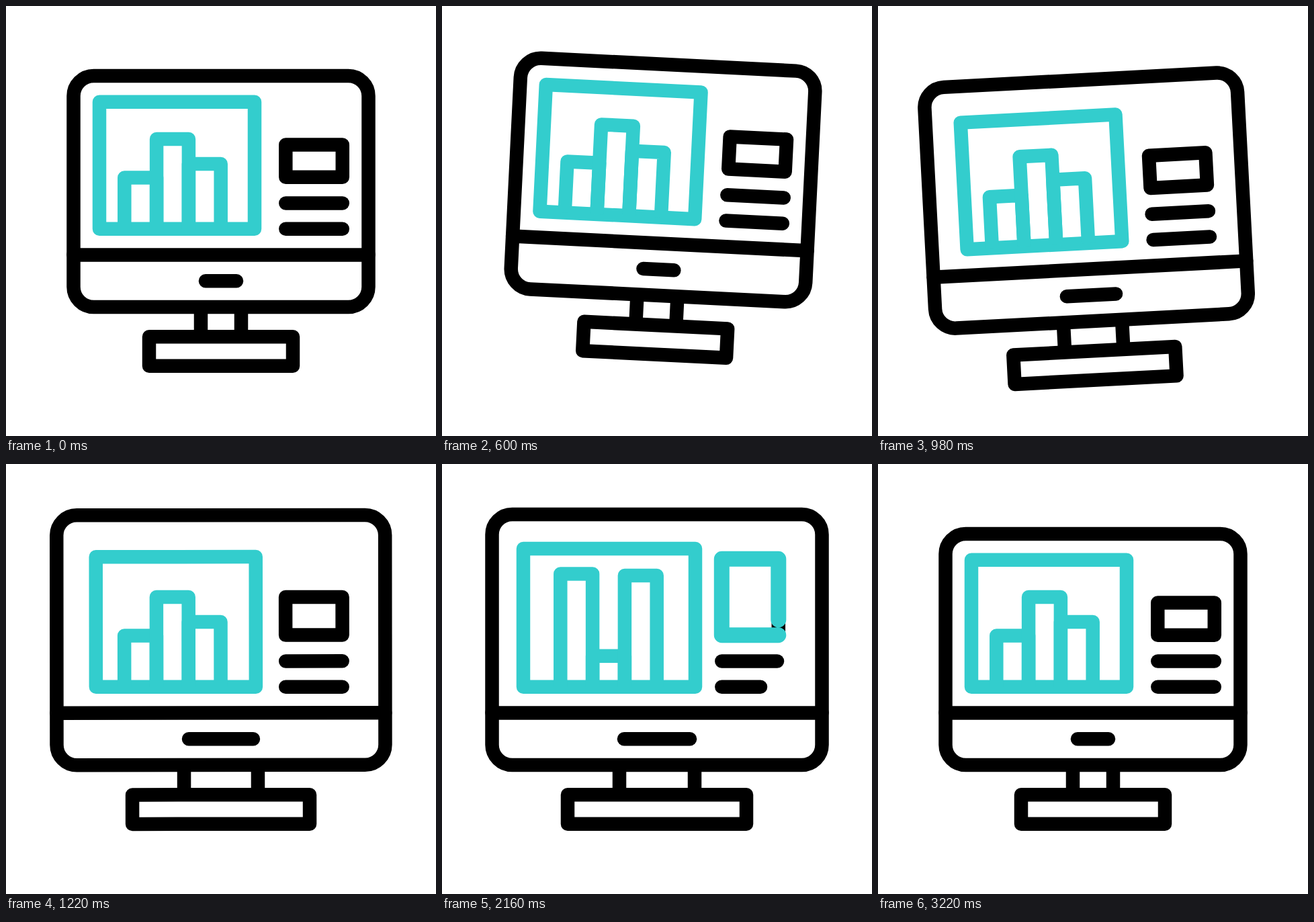
An HTML page for the animation above (3600 ms loop, 640 px wide and 640 px high).

```html
<!DOCTYPE html>
<html lang="en">
<head>
<meta charset="utf-8">
<title>Dashboard monitor</title>
<style>
  html, body { margin: 0; width: 100%; height: 100%; overflow: hidden; background: #fff; }
  svg { display: block; width: 100%; height: 100%; }
  path, rect {
    fill: none;
    stroke: #000;
    stroke-width: 20.5;
    stroke-linejoin: round;
  }
  .cap { stroke-linecap: round; }
  .teal { stroke: #33cdcd; }
  #trace { stroke-width: 23; }
</style>
</head>
<body>
<svg viewBox="0 0 640 640">
  <g id="monitor">
    <path id="legs"/>
    <path id="base"/>
    <rect id="screen" rx="30"/>
    <path id="divider" class="cap"/>
    <path id="button" class="cap"/>
    <path id="panel" class="teal"/>
    <path id="bar1" class="teal"/>
    <path id="bar2" class="teal"/>
    <path id="bar3" class="teal"/>
    <path id="card"/>
    <path id="trace" class="teal cap" pathLength="1"/>
    <path id="line1" class="cap"/>
    <path id="line2" class="cap"/>
  </g>
</svg>
<script>
const LOOP = 3600;
const $ = id => document.getElementById(id);
const draw = (id, d) => $(id).setAttribute('d', d);
const box = (x0, y0, x1, y1) => `M${x1} ${y1}H${x0}V${y0}H${x1}Z`;
const bar = (x, top) => `M${x} 332V${top}h47.8V332`;
const hline = (x0, x1, y) => `M${x0} ${y}H${x1}`;
const clamp = v => Math.min(1, Math.max(0, v));
const ease = p => p * p * (3 - 2 * p);

// Eased value at time t through [time, value] keys.
function track(t, ...keys) {
  const i = keys.findIndex(k => t < k[0]);
  if (i === 0) return keys[0][1];
  if (i < 0) return keys[keys.length - 1][1];
  const [t0, v0] = keys[i - 1], [t1, v1] = keys[i];
  return v0 + (v1 - v0) * ease((t - t0) / (t1 - t0));
}

// One dip and return between two times.
const dip = (t, from, to) => 54 * Math.sin(Math.PI * clamp((t - from) / (to - from))) ** 2;

function render(t) {
  const lift = track(t, [200, 0], [460, -40], [860, 40], [1110, 0]);
  const tilt = track(t, [300, 0], [560, 3], [980, -3], [1240, 0]);
  $('monitor').setAttribute('transform', `translate(0 ${lift}) rotate(${tilt} 320 458)`);

  // Frame and stand widen together.
  const grow = track(t, [640, 0], [1300, 1], [2880, 1], [3210, 0]);
  const w = 26 * grow, top = 104 - 29 * grow;
  const screen = { x: 100.5 - w, y: top, width: 439 + 2 * w, height: 448 - top };
  for (const key in screen) $('screen').setAttribute(key, screen[key]);
  draw('divider', hline(100.5 - w, 539.5 + w, 370.5));
  draw('button', hline(297 - w, 343 + w, 409.3));
  draw('legs', `M${290 - w} 448V492M${350 + w} 448V492`);
  draw('base', box(213 - w, 492.3, 427 + w, 535.8));

  const open = track(t, [1040, 0], [1560, 1], [2880, 1], [3210, 0]);
  draw('panel', box(139 - 18 * open, 142.8 - 16.8 * open, 370 + 7 * open, 331.7));
  draw('bar1', bar(176.3, track(t, [1280, 255.5], [2060, 158.5], [2800, 255.5])));
  draw('bar2', bar(224.1, track(t, [1360, 198], [2140, 286], [3040, 198])));
  draw('bar3', bar(271.9, track(t, [1440, 235], [2240, 164], [3210, 235])));

  const cardTop = track(t, [1100, 206.5], [1640, 141.3], [2825, 141.3], [3210, 206.5]);
  const card = box(416.3, cardTop, 500.8, 254.7);
  draw('card', card);
  draw('line1', hline(416.3, 500.8 - dip(t, 1220, 2220) - dip(t, 2220, 2900), 293.5));
  draw('line2', hline(416.3, 500.8 - dip(t, 1500, 2380) - dip(t, 2380, 3120), 331.8));

  // Highlight runs round the card, then its tail follows.
  const head = track(t, [1640, 0], [2250, 1]);
  const tail = track(t, [2250, 0], [2800, 1]);
  const trace = $('trace');
  draw('trace', head < 1 ? card.replace('Z', 'V254.7') : card.replace('Z', 'V254.7'));
  trace.setAttribute('stroke-dasharray', `${head - tail} 2`);
  trace.setAttribute('stroke-dashoffset', -tail);
  trace.style.display = head - tail > 0.001 ? '' : 'none';
}

function tick() {
  render(performance.now() % LOOP);
  requestAnimationFrame(tick);
}
tick();
</script>
</body>
</html>
```
